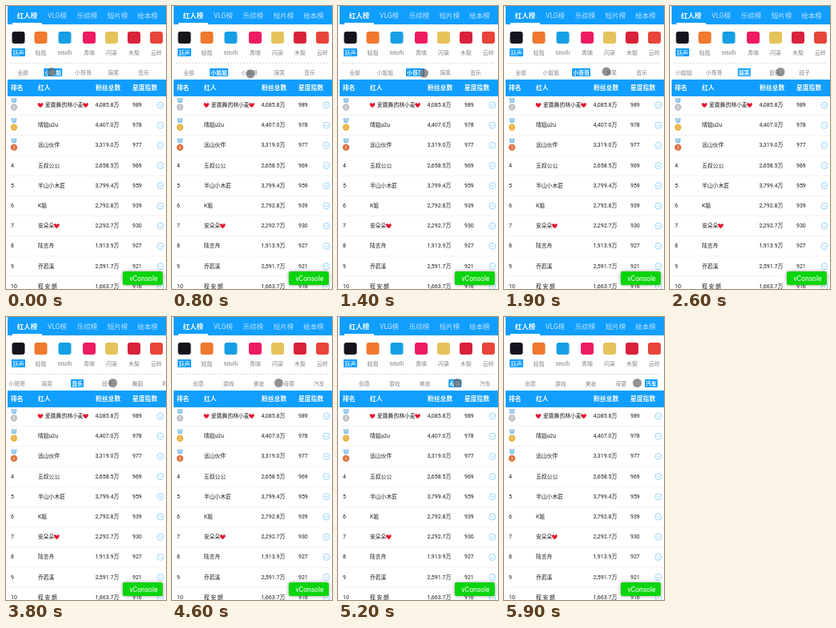
Animation, 200 px wide and 354 px high, one loop 6 s. Source, as an HTML page with a canvas:

```html
<!DOCTYPE html>
<html lang="zh">
<head>
<meta charset="utf-8">
<style>
html, body { margin: 0; width: 100%; height: 100%; overflow: hidden; background: #fff; }
canvas { display: block; }
</style>
</head>
<body>
<canvas id="stage" width="200" height="354"></canvas>
<script>
const ctx = document.getElementById('stage').getContext('2d');
const BLUE = '#109eff', GREY = '#808080', INK = '#1c1c1c';
const LEFT = 2, RIGHT = 200, LOOP = 6000;

const boards = [['红人榜', 26.5], ['VLG榜', 64], ['乐综榜', 101.5], ['短片榜', 139.5], ['绘本榜', 177]];
const platforms = [
  ['跃声', 15.5, '#15131c'], ['轻指', 43.5, '#f0782f'], ['tiltofli', 73.5, '#169fe6'], ['青映', 104, '#ee1b62'],
  ['闪录', 132, '#e5c35b'], ['木梨', 160, '#d9213b'], ['云岭', 188, '#e8443a']
];
const tabs = ['全部', '小姐姐', '小哥哥', '搞笑', '音乐', '段子', '舞蹈', '时尚', '创意', '游戏', '美妆', '母婴', '汽车'];
const rows = [
  ['爱跳舞的林小麦', '4,085.8', 989], ['晴姐u2u', '4,407.0', 978], ['远山伙伴', '3,319.0', 977],
  ['五叔公公', '2,658.5', 969], ['半山小木匠', '3,799.4', 959], ['K姐', '2,792.8', 939],
  ['安朵朵', '2,292.7', 930], ['陆言舟', '1,913.9', 927], ['乔若溪', '2,591.7', 921], ['程 安 朗', '1,663.7', 916]
];

// Timelines: [time, value]
const selection = [[0, 1], [1000, 2], [2000, 3], [3000, 4], [3900, 5], [5000, 11], [5600, 12]];
const scroll = [[0, 0], [2000, 0], [2300, 41.5], [3000, 41.5], [3300, 83], [3900, 83], [4200, 124.5], [4600, 290]];
const pointerX = [[0, 57], [300, 57], [800, 98], [1100, 98], [1900, 128], [2600, 138], [3800, 133.5], [4600, 133.5], [5000, 143], [5600, 166.5]];
const pointerY = [[0, 82.5], [300, 82.5], [800, 85], [1100, 85], [1900, 82], [2600, 82.5]];

function tween(keys, time) {
  const next = keys.findIndex(key => key[0] > time);
  if (next < 0) return keys[keys.length - 1][1];
  const [t0, a] = keys[next - 1], [t1, b] = keys[next];
  const p = (time - t0) / (t1 - t0);
  return a + (b - a) * p * p * (3 - 2 * p);
}

function rect(x, y, w, h, color, radius = 0) {
  ctx.fillStyle = color;
  ctx.beginPath();
  ctx.roundRect(x, y, w, h, radius);
  ctx.fill();
}

function circle(x, y, r, color) {
  ctx.fillStyle = color;
  ctx.beginPath();
  ctx.arc(x, y, r, 0, 7);
  ctx.fill();
}

function line(points, color, width = 0.7) {
  ctx.strokeStyle = color;
  ctx.lineWidth = width;
  ctx.beginPath();
  points.forEach(([x, y]) => ctx.lineTo(x, y));
  ctx.stroke();
}

function text(str, x, y, size, color, align = 'left', weight = 400) {
  ctx.font = `${weight} ${size}px Roboto, "Noto Sans CJK SC", "Noto Sans CJK", sans-serif`;
  ctx.textAlign = align;
  ctx.textBaseline = 'middle';
  ctx.fillStyle = color;
  ctx.fillText(str, x, y);
}

function heart(x, y) {
  ctx.fillStyle = '#e5152f';
  ctx.beginPath();
  ctx.moveTo(x, y + 3);
  ctx.bezierCurveTo(x - 6, y - 1, x - 2.5, y - 5, x, y - 1.5);
  ctx.bezierCurveTo(x + 2.5, y - 5, x + 6, y - 1, x, y + 3);
  ctx.fill();
}

function medal(label, color, y) {
  for (const x of [7.5, 10, 12.5]) line([[x, y - 9], [x + (10 - x) * 0.3, y - 3]], '#55a9dc', 1.2);
  circle(10, y + 2.5, 4.2, color);
  text(label, 10, y + 3, 5, '#fff', 'center');
}

function drawTop() {
  rect(LEFT, 0, RIGHT - LEFT, 23, BLUE);
  boards.forEach(([name, x], i) =>
    text(name, x, 12, 8.5, i ? '#c4e6ff' : '#fff', 'center', i ? 400 : 700));
  rect(8, 21, 37, 2, '#fff');

  platforms.forEach(([name, x, color], i) => {
    rect(x - 8, 32, 16, 15, color, 3);
    if (!i) rect(x - 8.5, 53, 17, 10, BLUE, 1);
    text(name, x, 58.5, 7, i ? GREY : '#fff', 'center');
  });
  ctx.setLineDash([2, 2]);
  line([[5, 71.5], [197, 71.5]], '#c8c8c8');
  ctx.setLineDash([]);
}

function drawTabs(time) {
  const active = selection.filter(key => key[0] <= time).pop()[1];
  const offset = tween(scroll, time);
  ctx.save();
  ctx.beginPath();
  ctx.rect(LEFT, 73, RIGHT - LEFT, 19);
  ctx.clip();
  tabs.forEach((name, i) => {
    const x = 21 + 37.75 * i - offset, width = name.length * 7 + 2;
    if (i === active) rect(x - width / 2, 78, width, 10, BLUE, 1);
    text(name, x, 83.5, 6.8, i === active ? '#fff' : GREY, 'center', i === active ? 700 : 400);
  });
  ctx.restore();
}

function drawTable() {
  rect(LEFT, 92, RIGHT - LEFT, 21, BLUE);
  [['排名', 6], ['红人', 40], ['粉丝总数', 112], ['星度指数', 158]].forEach(([name, x]) =>
    text(name, x, 103, 7.8, '#fff', 'left', 700));

  rows.forEach(([name, fans, score], i) => {
    const y = 124 + i * 25.2;
    if (i < 3) medal([2, 1, 3][i], ['#bfc1c6', '#e9b443', '#e1703a'][i], y);
    else text(i + 1, 6, y, 7, INK);
    const x = i ? 40 : 49;
    text(name, x, y, 6.8, INK);
    if (!i) heart(43, y);
    if (!i || i === 6) heart(x + ctx.measureText(name).width + 3, y);
    text(fans + '万', 111.5, y, 7, INK);
    text(score, 158, y, 7, INK);

    ctx.strokeStyle = '#6fc3f5';
    ctx.lineWidth = 0.7;
    ctx.beginPath();
    ctx.arc(193, y, 4, 0, 7);
    ctx.stroke();
    line([[191, y - 0.8], [193, y + 1.2], [195, y - 0.8]], '#6fc3f5');
    line([[LEFT, y + 12.6], [RIGHT, y + 12.6]], '#eee');
  });
}

function drawConsoleButton() {
  ctx.save();
  ctx.shadowColor = 'rgba(0,0,0,.4)';
  ctx.shadowBlur = 4;
  rect(146, 332, 50, 17, '#0ad40e', 2);
  ctx.restore();
  text('vConsole', 172, 341, 8.5, '#fff', 'center');
}

function draw(now) {
  const time = Math.floor(now % LOOP / 100) * 100;
  rect(0, 0, 200, 354, '#fff');
  drawTop();
  drawTabs(time);
  drawTable();
  drawConsoleButton();
  circle(tween(pointerX, time), tween(pointerY, time), 5.5, 'rgba(95,95,95,.68)');
  requestAnimationFrame(draw);
}
draw(0);
</script>
</body>
</html>
```
